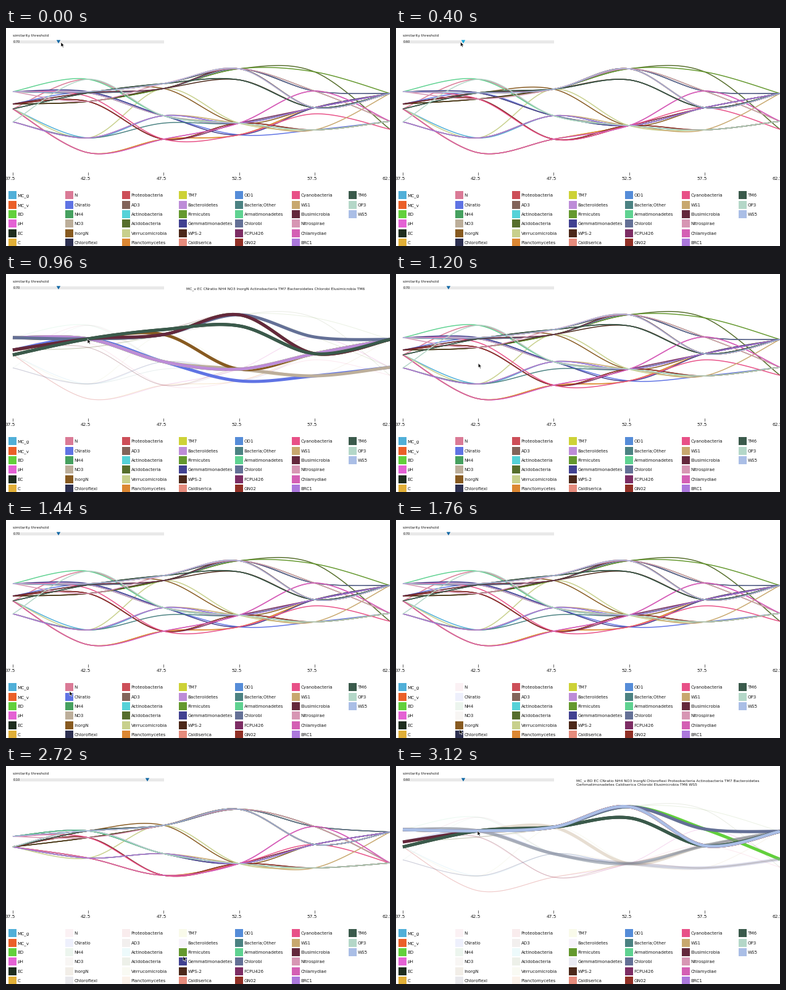
A matplotlib script for the animation above (3.2 s loop, 622 by 353 pixels).

```python
import numpy as np
import matplotlib.pyplot as plt
from matplotlib.animation import FuncAnimation
from matplotlib.patches import Polygon, Rectangle

W, H, DPI = 622, 353, 100
PT = 72 / DPI
FRAMES, STEP = 40, 80

COLORS = dict(entry.split("=") for entry in """
MC_g=#50afd8 MC_v=#eb5f28 BD=#62d03c pH=#e462d4 EC=#1e2d1e C=#e1af37
N=#da7a96 CNratio=#5f73e4 NH4=#46a05f NO3=#bcae9a InorgN=#875a20
Chloroflexi=#2d3050 Proteobacteria=#cd4e58 AD3=#82645a
Actinobacteria=#55d2d8 Acidobacteria=#566e2c Verrucomicrobia=#c8d08c
Planctomycetes=#dc8732 TM7=#cdd237 Bacteroidetes=#bd8cd8
Firmicutes=#64982e Gemmatimonadetes=#414191 WPS-2=#4b2819
Caldiserica=#e68c7d OD1=#558cd8 Bacteria;Other=#4b8282
Armatimonadetes=#5fd291 Chlorobi=#647096 FCPU426=#7d2d64 GN02=#913026
Cyanobacteria=#e85087 WS1=#c8a86e Elusimicrobia=#64283c
Nitrospirae=#d796b4 Chlamydiae=#d45fb4 BRC1=#ac78dc TM6=#3a5a4b
OP3=#b4d7c8 WS5=#aabee6
""".split())
NAMES = list(COLORS)

# bundle routes through the first and last three axes; others take the default
LEFT = {
    "default": (103, 105, 142),
    "MC_v NH4 Chlorobi": (103, 105, 98),
    "InorgN Elusimicrobia": (123, 105, 98),
    "EC TM6": (131, 105, 90),
    "CNratio": (123, 105, 142),
    "BD Chloroflexi Proteobacteria Caldiserica WS5": (103, 103, 90),
    "Gemmatimonadetes": (103, 103, 142),
    "Nitrospirae": (103, 119, 90),
    "AD3 FCPU426 GN02": (123, 119, 180),
    "Acidobacteria Firmicutes WPS-2": (123, 119, 98),
    "Armatimonadetes": (103, 83, 142),
    "N": (131, 83, 142),
    "OP3": (152, 83, 142),
    "MC_g": (131, 178, 142),
    "Verrucomicrobia": (131, 178, 98),
    "OD1 WS1 BRC1": (152, 178, 142),
    "Bacteria;Other": (152, 178, 154),
    "pH C Planctomycetes Chlamydiae": (131, 202, 180),
    "Cyanobacteria": (103, 111, 180),
}
RIGHT = {
    "default": (154, 129, 106),
    "MC_v NH4 Proteobacteria Caldiserica Elusimicrobia WS5": (66, 129, 106),
    "Chloroflexi Chlorobi": (66, 102, 106),
    "BD Nitrospirae": (66, 102, 151),
    "EC WPS-2 TM6": (84, 129, 106),
    "Firmicutes": (66, 71, 106),
    "Acidobacteria": (66, 71, 164),
    "N NO3 AD3 Verrucomicrobia Armatimonadetes GN02 OP3": (154, 165, 151),
    "WS1": (154, 165, 106),
    "CNratio": (173, 165, 151),
    "C Planctomycetes Gemmatimonadetes": (173, 129, 106),
    "pH Chlamydiae": (154, 102, 151),
    "Cyanobacteria": (173, 139, 164),
}

# heights that bundles snap to when the threshold is lowered
MEDIUM = [(103, 123, 131, 152), (83, 105, 115, 178, 202), (99, 142, 180),
          (66, 84, 158), (71, 102, 129, 165), (106, 151, 164)]
LOOSE = [(114, 131), (105, 116, 149), (96, 142, 177),
         (70, 158), (98, 127, 165), (107, 157)]
AXES_X = np.linspace(11, W, 6)
HUB_X, HUB_Y = 132, 105


def route(name, table):
    hits = [r for key, r in table.items() if name in key.split()]
    return hits[0] if hits else table["default"]


ROUTES = np.array([route(n, LEFT) + route(n, RIGHT) for n in NAMES], float)


def snap(y, heights):
    h = np.array(heights)
    return h[np.abs(y[:, None] - h).argmin(axis=1)]


def node_heights(t):
    if t > 0.65:
        return ROUTES
    bundles = MEDIUM if t > 0.35 else LOOSE
    return np.array([snap(y, b) for y, b in zip(ROUTES.T, bundles)]).T


def catmull(p, n=24):
    """Catmull-Rom spline along the last axis, end points doubled."""
    p = np.atleast_2d(p)
    q = np.concatenate([p[:, :1], p, p[:, -1:]], axis=1)
    m = (q[:, 2:] - q[:, :-2]) / 2
    u = np.linspace(0, 1, n)
    a, b = p[:, :-1, None], p[:, 1:, None]
    ma, mb = m[:, :-1, None], m[:, 1:, None]
    y = ((2*u**3 - 3*u**2 + 1) * a + (u**3 - 2*u**2 + u) * ma
         + (3*u**2 - 2*u**3) * b + (u**3 - u**2) * mb)
    return y.reshape(len(p), -1)


def threshold(f):
    steps = [(0, 0.7), (4, 0.6), (9, 0.7), (28, 0.44), (29, 0.1), (37, 0.6)]
    return [t for start, t in steps if f >= start][-1]


def legend_xy(i):
    return round(4.2 + i // 6 * 91.8), round(264.3 + i % 6 * 15.35)


def off_frame(i):
    """Entries go off one per frame, with a pause for the slider."""
    return 13 + i + (2 if i > 14 else 0)


SWITCHED = range(NAMES.index("N"), NAMES.index("WPS-2"))


def is_on(i, f):
    kept = i not in SWITCHED or NAMES[i] == "Firmicutes"
    return kept or f < off_frame(i)


MOVES = np.array([(0, 89, 23), (4, 109, 22), (8, 91, 24), (10, 91, 23),
                  (11, HUB_X, HUB_Y), (13, HUB_X, HUB_Y), (18, 135, 203.5),
                  (27, 103, 46), (29, 229, 22), (37, 109, 22),
                  (38, HUB_X, HUB_Y)])


def cursor_xy(f):
    for i in SWITCHED:
        if off_frame(i) == f + 1:
            x, y = legend_xy(i)
            return x + 7, y + 13
    return tuple(np.interp(f, MOVES[:, 0], MOVES[:, k]) for k in (1, 2))


plt.rcParams["font.family"] = "DejaVu Sans"
fig = plt.figure(figsize=(W / DPI, H / DPI), dpi=DPI, facecolor="white")
ax = fig.add_axes([0, 0, 1, 1])
ax.set_xlim(0, W)
ax.set_ylim(H, 0)
ax.axis("off")


def label(x, y, s, px, **kw):
    return ax.text(x, y, s, fontsize=px * PT, color="#1a1a1a", **kw)


def box(x, y, w, h, color):
    return ax.add_patch(Rectangle((x, y), w, h, fc=color, lw=0))


# slider
label(11, 14, "similarity threshold", 6)
box(11, 19.5, 244.5, 5.5, "#e9e9e9")
value = label(12, 24, "", 5)
handle = ax.add_patch(Polygon([(0, 0)] * 3, lw=0, zorder=4))
picked = [label(292, 25.5, "", 6), label(292, 32, "", 6)]

# time axis
for i, x in enumerate(AXES_X):
    ax.plot([x, x], [234, 237.5], color="#666666", lw=PT)
    label(x - 4, 246, f"{37.5 + 5 * i:.1f}", 7.5, ha="center", clip_on=True)

# legend
swatches = []
for i, name in enumerate(NAMES):
    x, y = legend_xy(i)
    swatches.append(box(x, y, 13, 13, COLORS[name]))
    label(x + 14.5, y + 9.4, name, 7.2)

curve_x = catmull(AXES_X)[0]
lines = [ax.plot([], [], color=c, solid_capstyle="butt")[0]
         for c in COLORS.values()]

ARROW = np.array([(0, 0), (0, 7.5), (1.8, 6), (3.1, 8.8), (4.3, 8.2),
                  (3.1, 5.6), (5.3, 5.4)])
cursor = ax.add_patch(Polygon(ARROW, fc="black", ec="white", lw=0.6 * PT, zorder=9))


def draw(f):
    t = threshold(f)
    cx, cy = cursor_xy(f)
    cursor.set_xy(ARROW + (cx, cy))

    hx = 253 - 240 * t
    handle.set_xy([(hx - 3.2, 19.5), (hx + 3.2, 19.5), (hx, 25)])
    dragging = 4 <= f <= 8 or f in (28, 29)
    handle.set_facecolor("#0fa5d8" if dragging else "#0a66a4")
    value.set_text(f"{t:.2f}")

    nodes = node_heights(t)
    near = (np.abs(nodes[:, 1] - cy) < 1.4) & (abs(cx - HUB_X) < 4)
    hover = near.any()
    names = [n for n, hit in zip(NAMES, near) if hit]
    for k, text in enumerate(picked):
        text.set_text(" ".join(names[12 * k:12 * k + 12]))

    for i, y in enumerate(catmull(nodes)):
        on = is_on(i, f)
        swatches[i].set_alpha(1 if on else 0.1)
        line = lines[i]
        line.set_data(curve_x, y)
        line.set_zorder(3 if near[i] else 2)
        line.set_linewidth((5 if near[i] else 1 if hover else 1.5) * PT)
        if not hover:
            line.set_alpha(1)
        elif near[i]:
            line.set_alpha(1 if on else 0.2)
        else:
            line.set_alpha(0.13)
    return []


anim = FuncAnimation(fig, draw, frames=FRAMES, interval=STEP, repeat=True,
                     repeat_delay=0, blit=False)
plt.show()
```
